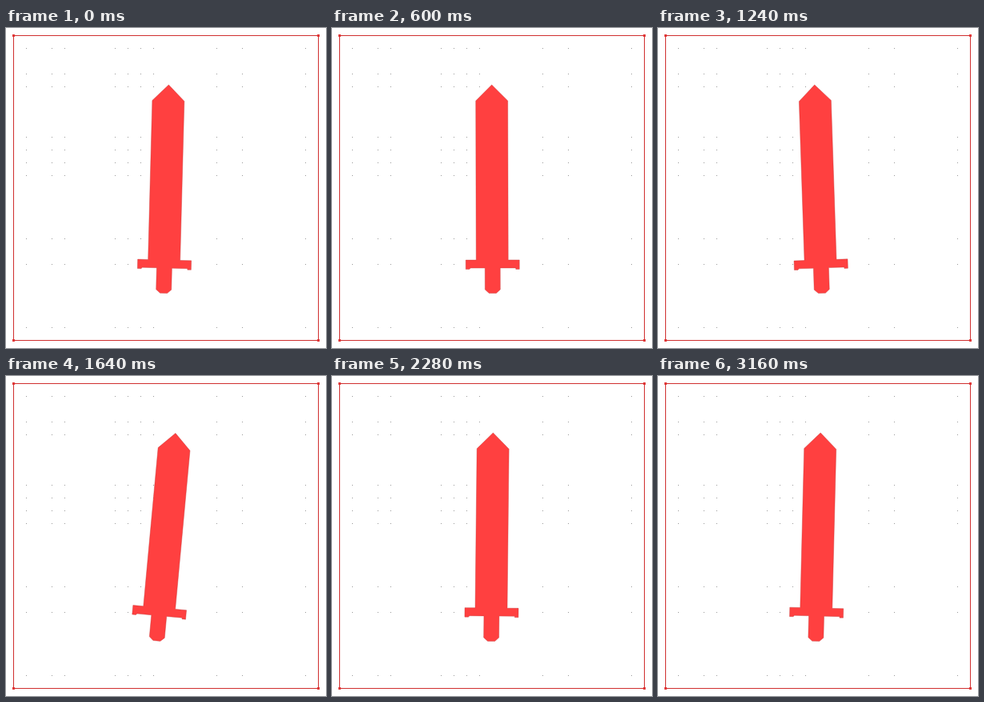
Recreate the animation shown at these times as an HTML page. Size 400x400 px, loop 3200 ms.

```html
<!DOCTYPE html>
<html lang="en">
<head>
<meta charset="utf-8">
<title>Swaying sword</title>
<style>
  html, body { margin: 0; width: 100%; height: 100%; overflow: hidden; background: #fff; }
  svg { display: block; width: 100vw; height: 100vh; }
</style>
</head>
<body>
<svg viewBox="0 0 400 400">
  <g shape-rendering="crispEdges">
    <g id="grid" fill="#999"></g>
    <rect x="9.5" y="9.5" width="381" height="381" fill="none" stroke="#d03030"/>
    <g id="corners" fill="#e03838"></g>
  </g>
  <path id="sword" fill="#ff4040" stroke="#c03030" stroke-width=".4"
    d="M200 71 L220 91 V290 H234 V301.5 H229.5 V300 H210 V327 L205 331.5 H196
       L191 327 V300 H173 L171.5 301.5 H167 V290 H180 V91 Z"/>
</svg>
<script>
  const LOOP = 3200, STEP = 40, HALF = 400;
  // Angle in degrees at each turning point, one every HALF ms
  const turns = [1.5, -1.8, 1.5, -2.1, 5.5, -2.8, 1.5, -1.9];
  const sword = document.getElementById('sword');

  function addSquare(parent, x, y, size) {
    const r = document.createElementNS('http://www.w3.org/2000/svg', 'rect');
    const attrs = { x, y, width: size, height: size };
    for (const k in attrs) r.setAttribute(k, attrs[k]);
    parent.append(r);
  }

  // Visible points of a 24-cell grid inside the border
  const marks = [1, 3, 4, 8, 9, 10, 11, 16, 18, 23].map(k => Math.floor(9.5 + k * 15.875));
  const grid = document.getElementById('grid');
  for (const y of marks) for (const x of marks) addSquare(grid, x, y, 1);

  const corners = document.getElementById('corners');
  for (const y of [8, 389]) for (const x of [8, 389]) addSquare(corners, x, y, 3);

  function angleAt(t) {
    const i = Math.floor(t / HALF);
    const from = turns[i], to = turns[(i + 1) % turns.length];
    const p = (t % HALF) / HALF;
    return from + (to - from) * (1 - Math.cos(Math.PI * p)) / 2;
  }

  function draw() {
    const t = Math.floor((performance.now() % LOOP) / STEP) * STEP;
    sword.setAttribute('transform', `rotate(${angleAt(t).toFixed(3)} 200 200)`);
    requestAnimationFrame(draw);
  }
  draw();
</script>
</body>
</html>
```
